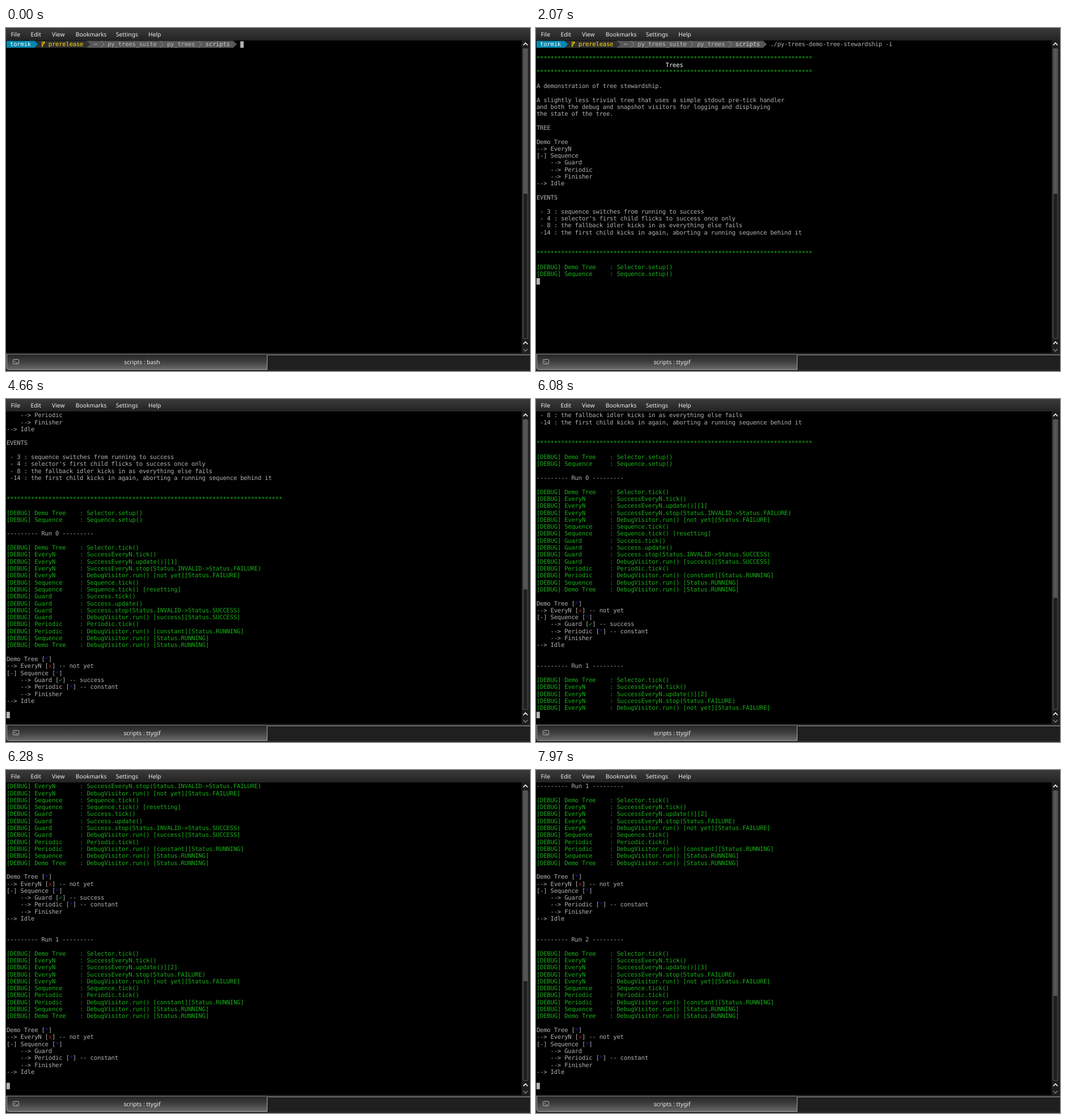
An HTML page for the animation above (8000 ms loop, 924 px wide and 606 px high).

```html
<!DOCTYPE html>
<html lang="en">
<head>
<meta charset="utf-8">
<title>Terminal session</title>
<style>
  html, body { margin: 0; width: 100%; height: 100%; overflow: hidden; background: #000; }
  svg { display: block; width: 924px; height: 606px; }
  text { white-space: pre; text-rendering: geometricPrecision; }
  .ui { font: 10.3px "Noto Sans", "Open Sans", sans-serif; fill: #f0f0f0; }
  .term { font: 12px "DejaVu Sans Mono", monospace; letter-spacing: -.224px; }
</style>
</head>
<body>
<svg viewBox="0 0 924 606">
  <defs>
    <linearGradient id="menuFill" x2="0" y2="1">
      <stop offset="0" stop-color="#3c3b3a"/><stop offset="1" stop-color="#232323"/>
    </linearGradient>
    <linearGradient id="tabFill" x2="0" y2="1">
      <stop offset="0" stop-color="#262626"/><stop offset=".5" stop-color="#404040"/><stop offset="1" stop-color="#686868"/>
    </linearGradient>
    <linearGradient id="grooveFill">
      <stop offset="0" stop-color="#484848"/><stop offset=".5" stop-color="#5a5a5a"/><stop offset="1" stop-color="#484848"/>
    </linearGradient>
    <linearGradient id="sliderFill">
      <stop offset="0" stop-color="#2e2e2e"/><stop offset=".5" stop-color="#1b1b1b"/><stop offset="1" stop-color="#2e2e2e"/>
    </linearGradient>
  </defs>

  <rect width="924" height="606"/>
  <rect width="924" height="22" fill="url(#menuFill)"/>
  <g class="ui">
    <text x="8.5" y="15">File</text>
    <text x="43.5" y="15">Edit</text>
    <text x="81" y="15">View</text>
    <text x="122.8" y="15">Bookmarks</text>
    <text x="193.8" y="15">Settings</text>
    <text x="251" y="15">Help</text>
  </g>

  <g id="screen" class="term" transform="translate(.9 22.6) scale(.879)"></g>

  <rect x="909" y="22" width="15" height="552" fill="#1e1e1e"/>
  <rect x="911" y="36" width="10" height="513" rx="2" fill="url(#grooveFill)"/>
  <rect id="slider" x="911.5" width="9" rx="2" fill="url(#sliderFill)" stroke="#505050"/>
  <g fill="none" stroke="#f4f4f4" stroke-width="1.8">
    <path d="M912.2 30.5l3.8-4 3.8 4M912.2 558.5l3.8-4 3.8 4"/>
    <path d="M912.2 567l3.8 4 3.8-4" stroke="#858585" stroke-width="1.3"/>
  </g>

  <rect y="574" width="924" height="32" fill="#262626"/>
  <rect x="461" y="578" width="463" height="25" fill="#1f1f1f"/>
  <rect x="2" y="577" width="458" height="26" fill="url(#tabFill)"/>
  <path d="M0 576.5H1.5V600.5Q1.5 603.5 4.5 603.5H460.5V577.5H924" fill="none" stroke="#a8a8a8"/>
  <path d="M2 576.5H460" stroke="#777"/>
  <g fill="none" stroke="#b4b4b4">
    <rect x="12.5" y="585.5" width="10" height="8" rx="1"/>
    <path d="M14.5 587.5l2 1.8-2 1.8M17.5 591.5h3" stroke-width=".9"/>
  </g>
  <text id="title" class="ui" x="240" y="594" text-anchor="middle"></text>
</svg>

<script>
const LOOP = 8000, ROWS = 44, CW = 7, CH = 14, OLD_LINES = 44;
const GREY = '#b2b2b2', GREEN = '#18b218', RED = '#b21818', BLUE = '#1818b2';
const PROMPT_COL = 67;
const COMMAND = './py-trees-demo-tree-stewardship -i';
const $ = id => document.getElementById(id);

const stars = '*'.repeat(79);
const debug = (name, msg) => `[DEBUG] ${name.padEnd(13)}: ${msg}`;
const visit = (name, msg, status) => debug(name, `DebugVisitor.run() ${msg}[Status.${status}]`);

function tree(guard = '') {
  return ['', 'Demo Tree [*]', '--> EveryN [x] -- not yet', '[-] Sequence [*]',
    '    --> Guard' + guard, '    --> Periodic [*] -- constant', '    --> Finisher', '--> Idle', ''];
}

function run(n) {
  const first = n === 0;
  return ['', `--------- Run ${n} ---------`, '',
    debug('Demo Tree', 'Selector.tick()'),
    debug('EveryN', 'SuccessEveryN.tick()'),
    debug('EveryN', `SuccessEveryN.update()][${n + 1}]`),
    debug('EveryN', `SuccessEveryN.stop(${first ? 'Status.INVALID->' : ''}Status.FAILURE)`),
    visit('EveryN', '[not yet]', 'FAILURE'),
    debug('Sequence', 'Sequence.tick()'),
    ...(first ? [
      debug('Sequence', 'Sequence.tick() [resetting]'),
      debug('Guard', 'Success.tick()'),
      debug('Guard', 'Success.update()'),
      debug('Guard', 'Success.stop(Status.INVALID->Status.SUCCESS)'),
      visit('Guard', '[success]', 'SUCCESS')] : []),
    debug('Periodic', 'Periodic.tick()'),
    visit('Periodic', '[constant]', 'RUNNING'),
    visit('Sequence', '', 'RUNNING'),
    visit('Demo Tree', '', 'RUNNING'),
    ...tree(first ? ' [✓] -- success' : '')];
}

// Line 0 is the prompt, drawn separately.
const log = ['', '', stars, ' '.repeat(37) + 'Trees', stars, '',
  'A demonstration of tree stewardship.', '',
  'A slightly less trivial tree that uses a simple stdout pre-tick handler',
  'and both the debug and snapshot visitors for logging and displaying',
  'the state of the tree.', '', 'TREE', '',
  'Demo Tree', '--> EveryN', '[-] Sequence', '    --> Guard', '    --> Periodic',
  '    --> Finisher', '--> Idle', '', 'EVENTS', '',
  ' - 3 : sequence switches from running to success',
  " - 4 : selector's first child flicks to success once only",
  ' - 8 : the fallback idler kicks in as everything else fails',
  ' -14 : the first child kicks in again, aborting a running sequence behind it',
  '', '', stars, '',
  debug('Demo Tree', 'Selector.setup()'), debug('Sequence', 'Sequence.setup()'),
  ...run(0), ...run(1), ...run(2)];

// [time, lines printed]
const output = [[0, 0], [2030, 1], [2070, 34], [4560, 47], [4660, 61],
  [6080, 69], [6180, 74], [6280, 83], [7870, 94], [7970, 105]];

const put = (str, col, row, fill) =>
  `<text x="${col * CW}" y="${row * CH + 11}" fill="${fill}">${str}</text>`;
const band = (col, n, fill) =>
  `<rect x="${col * CW}" width="${n * CW}" height="${CH}" fill="${fill}"/>`;
const cursor = (col, row) =>
  `<rect x="${col * CW}" y="${row * CH + 1}" width="${CW - .2}" height="${CH - 1}" fill="${GREY}"/>`;
const arrow = (col, fill) =>
  `<path d="M${col * CW - .2} 0l7.2 7-7.2 7z" fill="${fill}"/>`;
const divider = col =>
  `<path d="M${col * CW + .5} .3l6 6.7-6 6.7" fill="none" stroke="#9a9a9a"/>`;

function prompt(typed) {
  const teal = '#0087af', dark = '#303030', mid = '#585858', pale = '#bcbcbc';
  return band(8, 16, dark) + band(23, 42, mid) + band(0, 8, teal) +
    arrow(8, teal) + arrow(23, dark) + arrow(65, mid) +
    [27, 44, 55].map(divider).join('') +
    `<path d="M71.5 1V13M71.5 11C71.5 8 75.3 8.5 75.3 3M73.2 4.5L75.3 2l1.8 2.5" fill="none" stroke="#ffd700" stroke-width="1.3"/>` +
    put('tormik', 1, 0, '#fff') + put('prerelease', 12, 0, '#ffd700') +
    put('⋯', 25, 0, pale) + put('py_trees_suite', 29, 0, pale) +
    put('py_trees', 46, 0, pale) + put('scripts', 57, 0, '#d0d0d0') +
    put(COMMAND.slice(0, typed), PROMPT_COL, 0, GREY);
}

function line(str, row) {
  if (!str) return '';
  if (/^(\[DEBUG|\*)/.test(str)) return put(str, 0, row, GREEN);
  const head = str.trim();
  if (head === 'Trees') return put(head, str.indexOf(head), row, '#fff');
  const marks = { x: RED, '*': BLUE, '✓': GREEN };
  let col = 0;
  return str.split(/(?<=\[)([x*✓])(?=\])/).map(part => {
    const piece = put(part, col, row, marks[part] || GREY);
    col += part.length;
    return piece;
  }).join('');
}

let shown = '';
function draw(t) {
  const step = Math.min(6, Math.max(0, Math.floor((t - 400) / 100)));
  const typed = Math.round(COMMAND.length * step / 6);
  const count = output.filter(([at]) => at <= t).pop()[1];
  const key = typed + '/' + count;
  if (key === shown) return;
  shown = key;

  const top = Math.max(0, count - ROWS + 1);
  let html = top ? '' : prompt(typed);
  for (let i = top; i < count; i++) html += line(log[i], i - top);
  html += cursor(count ? 0 : PROMPT_COL + typed, count - top);
  $('screen').innerHTML = html;

  const above = OLD_LINES + top;
  const y = 36 + 513 * above / (above + ROWS);
  $('slider').setAttribute('y', y);
  $('slider').setAttribute('height', 548.5 - y);
  $('title').textContent = 'scripts : ' + (step ? 'ttygif' : 'bash');
}

const start = performance.now();
function tick() {
  draw((performance.now() - start) % LOOP);
  requestAnimationFrame(tick);
}
tick();
</script>
</body>
</html>
```
